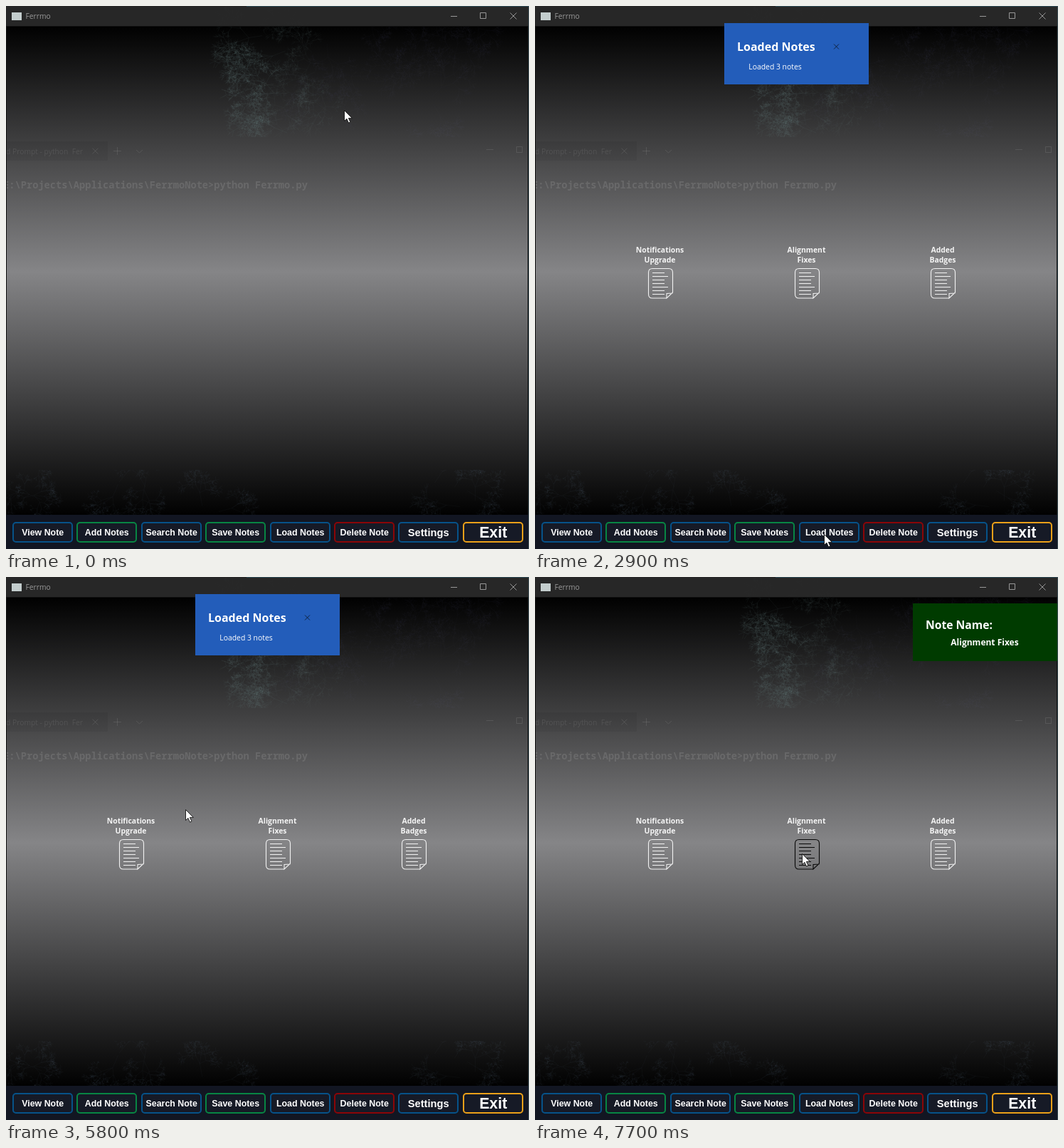
Animation of 735x762 px, one loop 8000 ms. Source, as an HTML page with a canvas:

```html
<!DOCTYPE html>
<html lang="en">
<head>
<meta charset="utf-8">
<style>
html, body { margin: 0; width: 100%; height: 100%; overflow: hidden; background: #000; }
canvas { display: block; }
</style>
</head>
<body>
<canvas id="stage" width="735" height="762"></canvas>
<script>
const W = 735, H = 762, LOOP = 8000, STEP = 100;
const UI = '"Open Sans", "Noto Sans", sans-serif';
const ARIAL = '"Liberation Sans", Arial, sans-serif';
const MONO = '"Noto Sans Mono", "DejaVu Sans Mono", monospace';
const view = document.getElementById('stage').getContext('2d');
let c = view;

let seed = 11;
const rnd = (lo = 0, hi = 1) => {
  seed = seed * 16807 % 2147483647;
  return lo + seed / 2147483647 * (hi - lo);
};

function rect(x, y, w, h, color) {
  c.fillStyle = color;
  c.fillRect(x, y, w, h);
}
function text(str, x, y, font, color, align = 'center') {
  c.font = font;
  c.fillStyle = color;
  c.textAlign = align;
  c.fillText(str, x, y);
}
function stroke(d, color, width = 1) {
  c.strokeStyle = color;
  c.lineWidth = width;
  c.stroke(new Path2D(d));
}
function cross(x, y, r, color) {
  stroke(`M${x - r} ${y - r}l${2 * r} ${2 * r}m0 ${-2 * r}l${-2 * r} ${2 * r}`, color);
}
function faded(alpha, paint) {
  c.globalAlpha = alpha;
  paint();
  c.globalAlpha = 1;
}

// Faint foliage seen through the translucent window
function twig(x, y, angle, len, depth) {
  const x2 = x + Math.cos(angle) * len, y2 = y + Math.sin(angle) * len;
  c.moveTo(x, y);
  c.lineTo(x2, y2);
  if (!depth) return;
  for (let k = -1; k <= 1; k++)
    twig(x2, y2, angle + k * 0.7 + rnd(-0.6, 0.6), len * rnd(0.45, 0.95), depth - 1);
}
function trees(count, x0, x1, y0, y1, angle, spread, alpha) {
  c.strokeStyle = `rgba(125,145,152,${alpha})`;
  c.lineWidth = 1;
  for (let i = 0; i < count; i++) {
    c.beginPath();
    twig(rnd(x0, x1), y0 + (y1 - y0) * (i + rnd()) / count, angle + rnd(-spread, spread), 19, 5);
    c.stroke();
  }
}
function clipped(y, h, paint) {
  c.save();
  c.beginPath();
  c.rect(0, y, W, h);
  c.clip();
  paint();
  c.restore();
}

function paintButtons() {
  const blue = '#065289', green = '#078543', red = '#8b0507', amber = '#eba019';
  rect(0, 714, W, 48, '#121622');
  [['View Note', blue], ['Add Notes', green], ['Search Note', blue], ['Save Notes', green],
   ['Load Notes', blue], ['Delete Note', red], ['Settings', blue, 14.67], ['Exit', amber, 21.33]
  ].forEach(([label, color, size = 12.4], i) => {
    const x = Math.round(10 + i * 90.4);
    c.beginPath();
    c.roundRect(x, 725, 83, 27, 4);
    c.fillStyle = '#161a26';
    c.fill();
    c.strokeStyle = color;
    c.lineWidth = 2;
    c.stroke();
    text(label, x + 41.7, Math.round(738.5 + size * 0.35), `bold ${size}px ${ARIAL}`, '#fff');
  });
}

function paintBackdrop() {
  const g = c.createLinearGradient(0, 29, 0, 714);
  g.addColorStop(0, '#010101');
  g.addColorStop(0.502, '#858587');
  g.addColorStop(1, '#010101');
  rect(0, 28, W, 687, g);

  clipped(0, 184, () => {
    trees(10, 360, 400, 35, 185, Math.PI, 0.4, 0.065);
    trees(8, 400, 470, 30, 180, Math.PI, 1, 0.04);
    trees(14, 440, W, 0, 180, 0, Math.PI, 0.025);
  });
  clipped(651, 63, () => {
    trees(10, 0, 300, 650, 710, 0, Math.PI, 0.045);
    trees(6, 590, W, 650, 710, 0, Math.PI, 0.045);
  });

  // Terminal behind the window
  const ghost = 'rgba(150,150,150,.22)';
  rect(0, 190, 143, 27, 'rgba(0,0,0,.06)');
  text('d Prompt - python  Fer', 0, 208, '10.3px ' + UI, ghost, 'left');
  cross(125.5, 203.5, 4, ghost);
  stroke('M151 203.5h11M156.5 198v11M183 202l4.5 4l4.5 -4M675 201.5h10M717.5 197.5h8v8h-8z', ghost);
  text('E:\\Projects\\Applications\\FerrmoNote>python Ferrmo.py', -4, 256,
       'bold 13.73px ' + MONO, 'rgba(140,140,140,.35)', 'left');
  paintButtons();
}

const backdrop = document.createElement('canvas');
backdrop.width = W;
backdrop.height = H;
c = backdrop.getContext('2d');
paintBackdrop();
c = view;

function windowFrame(active) {
  const ink = active ? '#fff' : '#989898';
  rect(0, 0, W, 28, active ? 'rgba(0,0,0,.6)' : 'rgba(43,43,43,.93)');
  rect(0, 28, W, 1, active ? '#191919' : '#101010');
  rect(0, 28, 1, 686, '#141414');
  rect(733, 28, 2, 686, '#101010');
  if (!active) {
    rect(338, 0, 397, 1, '#2c4a54');
    rect(734, 0, 1, H, '#3a4b52');
  }
  rect(8, 9, 14, 11, active ? '#dce4e4' : '#c3cdcd');
  text('Ferrmo', 27.5, 18, '10.3px ' + UI, ink, 'left');
  stroke('M625 14.5h9M666.5 9.5h8v8h-8z', ink);
  cross(713, 14, 4.5, ink);
}

function note(x, labels, dark) {
  const ink = dark ? '#080808' : '#f2f2f2';
  labels.forEach((s, i) => text(s, x, 345.5 + i * 14.5, 'bold 10.4px ' + UI, '#f4f4f4'));
  c.save();
  c.translate(Math.round(x) - 17, 368);
  stroke('M26 42H6Q.5 42 .5 36.5V6Q.5 .5 6 .5H29Q34.5 .5 34.5 6V34L26 42V35.5L34.5 35', ink, 1.1);
  for (let i = 0; i < 7; i++) stroke(`M6 ${6.5 + i * 5}H${i % 3 === 1 ? 28 : 23}`, ink);
  c.restore();
}

function toast() {
  rect(266, 24, 203, 86, '#235dba');
  text('Loaded Notes', 284, 63, 'bold 16px ' + UI, '#fff', 'left');
  text('Loaded 3 notes', 337.5, 89, '10.4px ' + UI, '#fff');
  cross(423.5, 57, 3.5, '#10233f');
}

function badge(name) {
  rect(531, 37, 203, 81, '#003b00');
  text('Note Name:', 549, 72.5, 'bold 15.7px ' + UI, '#fff', 'left');
  text(name, 632, 96, 'bold 12px ' + UI, '#fff');
}

// Pointer key points: time, x, y
const path = [
  [0, 475, 146], [900, 364, 496], [1200, 359, 531], [1800, 453, 622], [2300, 406, 741],
  [3100, 406, 741], [4000, 326, 463], [4100, 319, 363], [4900, 360, 90], [5000, 360, 90],
  [5800, 252, 326], [6100, 181, 396], [7000, 181, 396]
];
function pointerAt(t) {
  if (t >= 7700) return [375, 388];
  const i = path.findIndex(p => p[0] > t);
  if (i < 0) return null;
  const [t0, ...from] = path[i - 1], [t1, ...to] = path[i];
  return from.map((v, n) => Math.round(v + (to[n] - v) * (t - t0) / (t1 - t0)));
}
const arrow = new Path2D('M0 0V15L3.4 11.8L6 17.5L8.4 16.4L5.9 10.9H10.8Z');
function pointer(x, y) {
  c.save();
  c.translate(x + 0.5, y + 0.5);
  c.fillStyle = '#fff';
  c.fill(arrow);
  c.strokeStyle = '#111';
  c.lineWidth = 0.9;
  c.stroke(arrow);
  c.restore();
}

function draw(t) {
  const within = (a, b) => t >= a && t < b;
  const fadeIn = from => t < from + STEP ? 0.5 : 1;
  c.clearRect(0, 0, W, H);
  c.drawImage(backdrop, 0, 0);
  windowFrame(within(1000, 2800) || within(7200, 7400));
  if (t >= 2700) {
    note(175.5, ['Notifications', 'Upgrade'], within(6000, 7200));
    note(381.5, ['Alignment', 'Fixes'], t >= 7300);
    note(573, ['Added', 'Badges'], false);
  }
  if (within(2800, 5900)) faded(fadeIn(2800), toast);
  if (within(6000, 7200)) faded(fadeIn(6000), () => badge('Notifications'));
  if (t >= 7400) faded(fadeIn(7400), () => badge('Alignment Fixes'));
  const at = pointerAt(t);
  if (at) pointer(...at);
}

const start = performance.now();
function tick() {
  const t = (performance.now() - start) % LOOP;
  draw(Math.floor(t / STEP) * STEP);
  requestAnimationFrame(tick);
}
tick();
</script>
</body>
</html>
```
